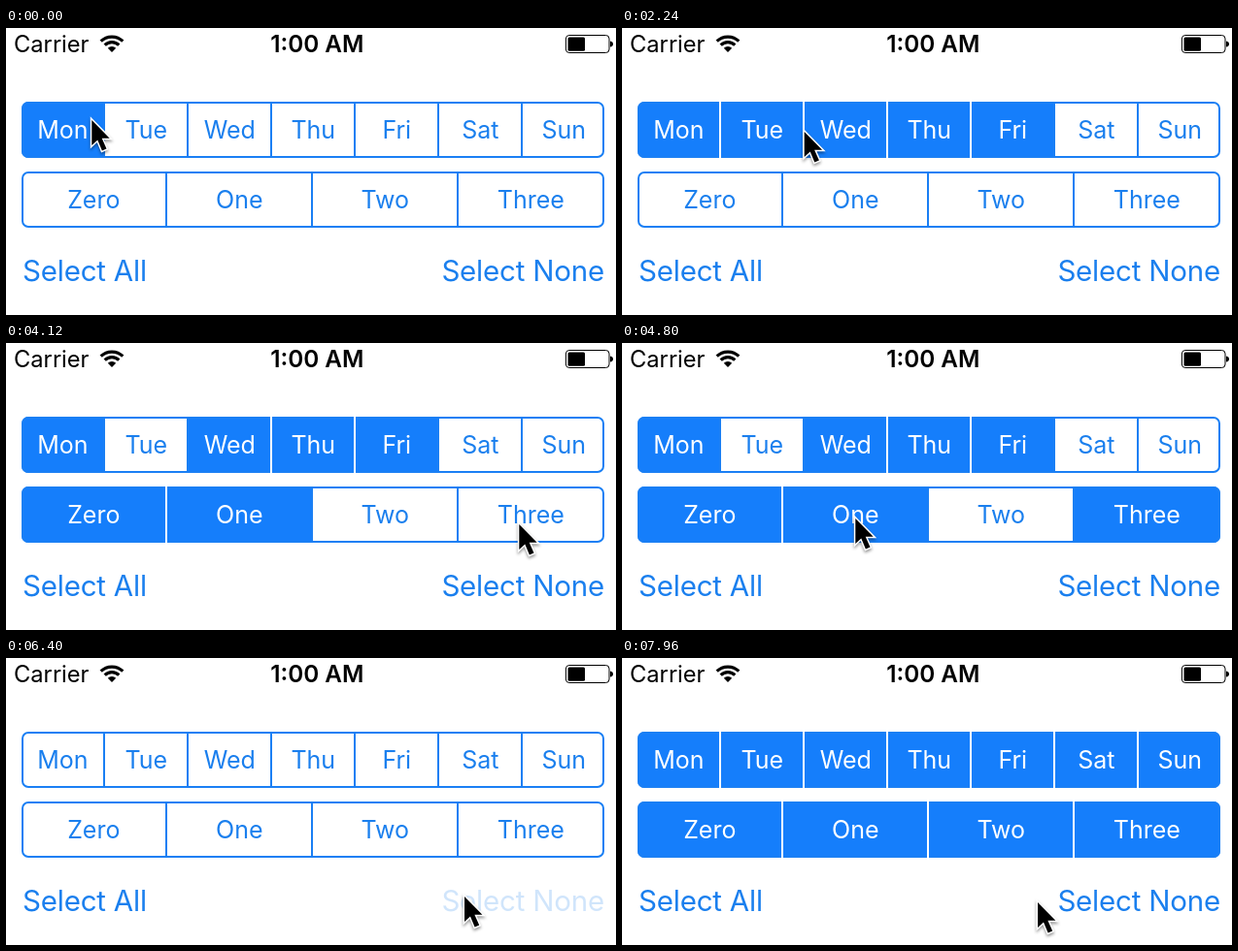
Write an HTML page that moves like this. It is 628 by 296 pixels and loops after 8000 ms.

```html
<!DOCTYPE html>
<html lang="en">
<head>
<meta charset="utf-8">
<title>Segmented controls</title>
<style>
html, body { margin: 0; width: 100%; height: 100%; overflow: hidden; background: #fff; }
svg { display: block; }
text { font: 25px Inter, "Open Sans", sans-serif; }
.cell text { text-anchor: middle; }
.blue { fill: #1a7fee; }
.status { font-size: 23.7px; }
.clock { font-size: 24.3px; font-weight: 600; text-anchor: middle; }
.button { font-size: 29.5px; letter-spacing: -.2px; }
#cursor { filter: drop-shadow(0 2px 1.5px rgba(0,0,0,.4)); }
</style>
</head>
<body>
<svg width="628" height="296" viewBox="0 0 628 296">
  <text class="status" x="8" y="25">Carrier</text>
  <g fill="none" stroke="#000" stroke-width="3.2">
    <path d="M97.7 13.7a16 16 0 0 1 22.6 0M101.7 17.7a10.3 10.3 0 0 1 14.6 0"/>
    <path d="M109 25l-4.2-4.2a6 6 0 0 1 8.4 0z" fill="#000" stroke="none"/>
  </g>
  <text class="clock" x="320.3" y="25">1:00 AM</text>
  <rect x="576.4" y="7.5" width="44.6" height="18" rx="3.5" fill="none" stroke="#000"/>
  <rect x="578.5" y="9.5" width="17.5" height="14.2" rx="1.5"/>
  <path d="M622 13.5q3 .5 3 3t-3 3z"/>
  <g id="rows"></g>
  <text id="All" class="button blue" x="17" y="261">Select All</text>
  <text id="None" class="button blue" x="616" y="261" text-anchor="end">Select None</text>
  <path id="cursor" d="M0 0V26L6 20.4 10.6 31.4 15.2 29.4 10.4 18.8H18.4Z" stroke="#fff" stroke-width="3" paint-order="stroke"/>
</svg>
<script>
const LOOP = 8000, BLUE = '#157efb', LINE = '#1a7ff4';
const $ = id => document.getElementById(id);
const clamp = v => Math.max(0, Math.min(1, v));

const rows = [
  { y: 76, names: ['Mon', 'Tue', 'Wed', 'Thu', 'Fri', 'Sat', 'Sun'] },
  { y: 148, names: ['Zero', 'One', 'Two', 'Three'] }
];

// Centres of everything that can be tapped
const centers = { All: [80, 250], None: [533, 250] };
for (const row of rows) {
  row.step = 602 / row.names.length | 0;
  row.names.forEach((name, i) => centers[name] = [15.3 + (i + .5) * row.step, row.y + 29]);
}

// A tap at a time, off the centre by dx, dy; the pointer stays for `hold` afterwards
const tap = (at, name, dx = 0, dy = 2, hold = 200) =>
  ({ at, name, x: centers[name][0] + dx, y: centers[name][1] + dy, hold });
const taps = [
  tap(-160, 'Mon', 30, -10), tap(440, 'Tue'), tap(760, 'Wed'), tap(1240, 'Thu', -12, -1),
  tap(1760, 'Fri'), tap(2440, 'Tue'), tap(3360, 'Zero', 15, 1), tap(3720, 'One'),
  tap(4220, 'Three', -12, 10), tap(4900, 'One', 0, 4, 420), tap(5640, 'Two', -28, 3),
  tap(6380, 'None', -61, -4), tap(7180, 'All', -24, -2, 600), tap(8060, 'None', -105, 2)
];
const ARRIVE = 100;

$('rows').innerHTML = rows.map(({ y, names, step }, r) => `
  <clipPath id="clip${r}"><rect x="16" y="${y}" width="600" height="58" rx="7"/></clipPath>
  <g clip-path="url(#clip${r})">${names.map((name, i) => `
    <g class="cell">
      <rect x="${16 + i * step}" y="${y}" width="${step}" height="58" fill="${BLUE}"/>
      ${['class="blue"', 'fill="#fff"'].map(paint =>
        `<text ${paint} x="${centers[name][0]}" y="${y + 38}">${name}</text>`).join('')}
    </g>`).join('')}
  </g>
  <rect x="17" y="${y + 1}" width="598" height="56" rx="6" fill="none" stroke="${LINE}" stroke-width="2"/>
  ${names.slice(1).map((_, i) => `<path class="divider" d="M${15 + (i + 1) * step} ${y}v58" stroke-width="2"/>`).join('')}`).join('');

const cells = [...document.querySelectorAll('.cell')];
const dividers = [...document.querySelectorAll('.divider')];

// A tapped cell shows a tint first, then fades to its new state
function cellState(name, t) {
  let on = false, level = 0;
  for (const { at, name: who } of taps) {
    if (at > t) break;
    if (who === 'All' || who === 'None') {
      on = who === 'All';
      level = +on;
    } else if (who === name) {
      on = !on;
      const p = .22 + .78 * clamp((t - at - 80) / 54);
      level = on ? p : 1 - p;
    }
  }
  return { on, level };
}

// A pressed button turns faint, then fades back after release
function buttonAlpha(name, t) {
  const { at } = taps.find(k => k.name === name);
  return t < at - 120 ? 1 : .2 + .8 * clamp((t - at - 40) / 240);
}

function pointer(t) {
  const i = taps.findIndex(k => k.at - ARRIVE > t);
  const to = taps[i < 0 ? taps.length - 1 : i];
  const from = i < 0 ? to : taps[i - 1];
  const start = from.at + from.hold;
  const u = clamp((t - start) / (to.at - ARRIVE - start)), e = u * u * (3 - 2 * u);
  return [from.x + (to.x - from.x) * e, from.y + (to.y - from.y) * e];
}

function draw() {
  const t = performance.now() % LOOP;
  let c = 0, d = 0;
  for (const { names } of rows) {
    let previous;
    for (const name of names) {
      const { on, level } = cellState(name, t);
      const [box, blue, white] = cells[c++].children;
      box.setAttribute('opacity', level);
      blue.setAttribute('opacity', 1 - level);
      white.setAttribute('opacity', level ** 2);
      if (previous !== undefined) dividers[d++].setAttribute('stroke', on && previous ? '#fff' : LINE);
      previous = on;
    }
  }
  for (const name of ['All', 'None']) $(name).setAttribute('opacity', buttonAlpha(name, t));
  $('cursor').setAttribute('transform', `translate(${pointer(t)})`);
  requestAnimationFrame(draw);
}
draw();
</script>
</body>
</html>
```
